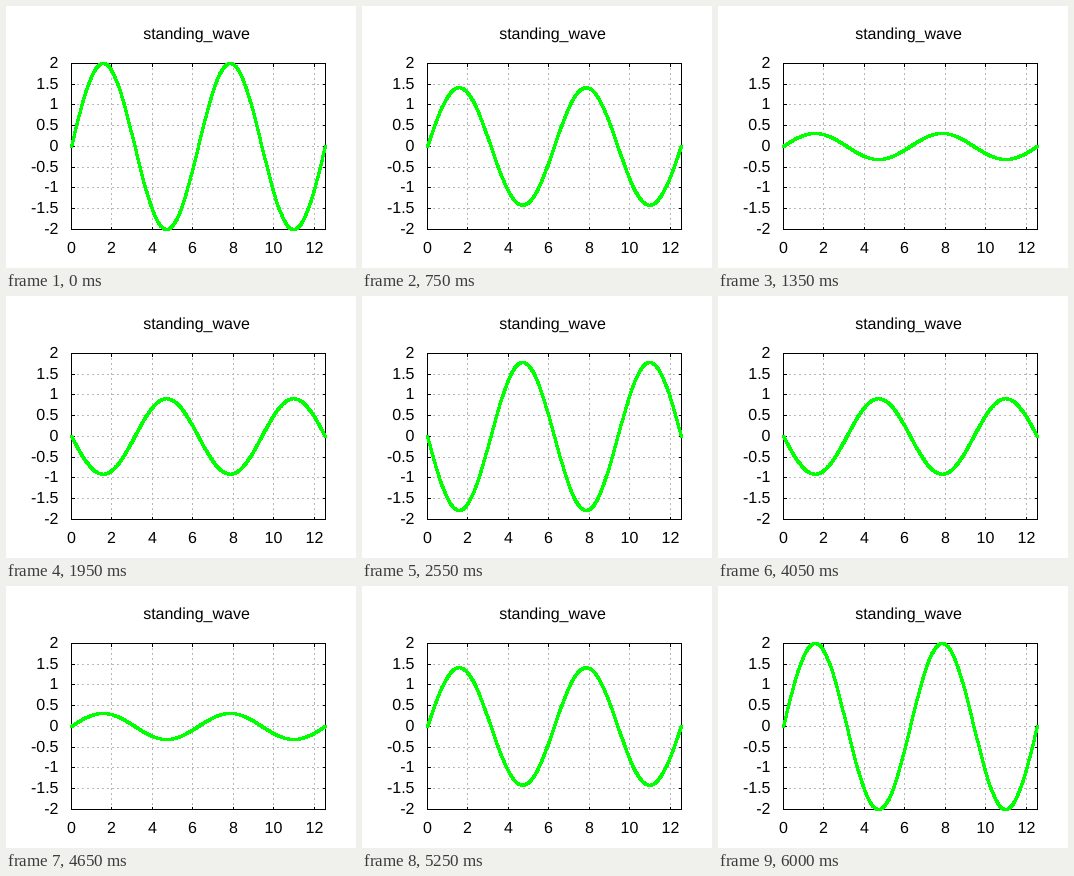
Animation of 350 by 262 pixels, one loop 6.15 s. Source, as an HTML page:

```html
<!DOCTYPE html>
<html lang="en">
<head>
<meta charset="utf-8">
<title>Standing wave</title>
<style>
  html, body { margin: 0; width: 100%; height: 100%; overflow: hidden; background: #fff; }
  svg { display: block; }
  path { fill: none; shape-rendering: crispEdges; }
  text { font: 16px "Liberation Sans", Arial, sans-serif; text-rendering: geometricPrecision; }
</style>
</head>
<body>
<svg width="350" height="262" viewBox="0 0 350 262">
  <g transform="translate(.5 .5)">
    <path id="grid" stroke="#b8b8b8" stroke-dasharray="2 3"/>
    <path id="axes" stroke="#000"/>
    <path id="wave" stroke="#0f0" stroke-width="3"/>
  </g>
  <g id="labels"><text x="190.5" y="33" text-anchor="middle">standing_wave</text></g>
</svg>
<script>
const LEFT = 65, RIGHT = 319, TOP = 57, BOTTOM = 223, TICK = 3;
const STEP_MS = 150, STEPS = 41, SAMPLES = 1000, X_MAX = 4 * Math.PI;
const $ = id => document.getElementById(id);
const mapX = x => LEFT + Math.round(x / X_MAX * (RIGHT - LEFT));
const mapY = y => BOTTOM - Math.round((y + 2) / 4 * (BOTTOM - TOP));

function addLabel(value, x, y, anchor) {
  const label = document.createElementNS("http://www.w3.org/2000/svg", "text");
  label.setAttribute("x", x);
  label.setAttribute("y", y);
  label.setAttribute("text-anchor", anchor);
  label.textContent = value;
  $("labels").append(label);
}

function drawAxes() {
  let grid = "";
  let axes = `M${LEFT} ${TOP}H${RIGHT}V${BOTTOM}H${LEFT}Z`;
  for (let value = 0; value <= 12; value += 2) {
    const x = mapX(value);
    if (value) grid += `M${x} ${BOTTOM}V${TOP}`;
    axes += `M${x} ${BOTTOM}v${-TICK}M${x} ${TOP}v${TICK}`;
    addLabel(value, x + 0.5, 247, "middle");
  }
  for (let value = -2; value <= 2; value += 0.5) {
    const y = mapY(value);
    if (Math.abs(value) < 2) grid += `M${LEFT} ${y}H${RIGHT}`;
    axes += `M${LEFT} ${y}h${TICK}M${RIGHT} ${y}h${-TICK}`;
    addLabel(value, 52.5, y + 5, "end");
  }
  $("grid").setAttribute("d", grid);
  $("axes").setAttribute("d", axes);
}

// The curve is traced with a 3 x 3 pixel square brush.
function drawWave(now) {
  const step = Math.floor(now / STEP_MS) % STEPS;
  const amplitude = 2 * Math.cos(2 * Math.PI * step / (STEPS - 1));
  let path = "";
  for (let i = 0; i < SAMPLES; i++) {
    const x = X_MAX * i / (SAMPLES - 1);
    path += `M${mapX(x) - 1.5} ${mapY(amplitude * Math.sin(x))}h3`;
  }
  $("wave").setAttribute("d", path);
}

function animate() {
  drawWave(performance.now());
  requestAnimationFrame(animate);
}

drawAxes();
animate();
</script>
</body>
</html>
```
